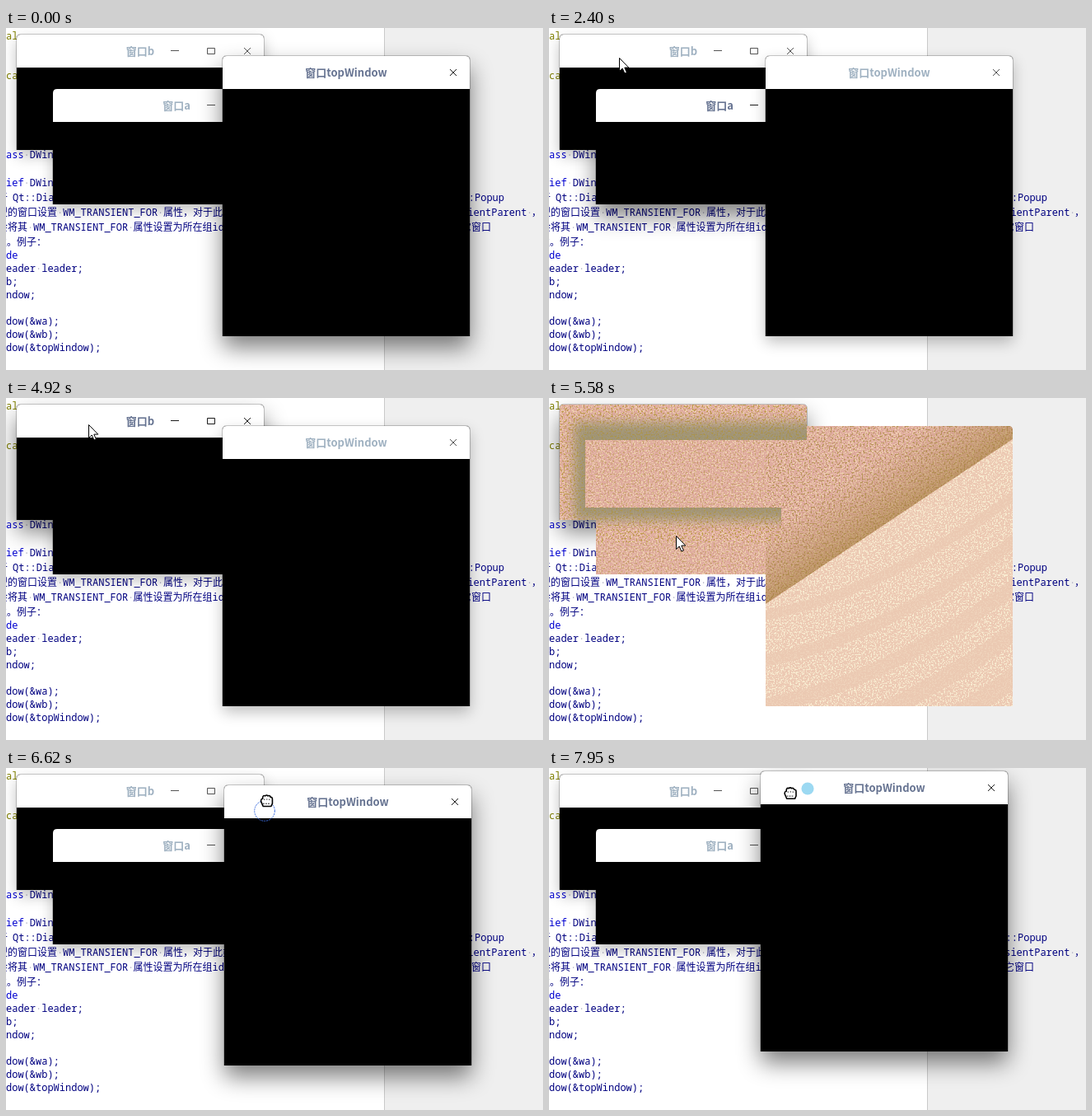
An HTML page for the animation above (7990 ms loop, 652 by 415 pixels).

```html
<!DOCTYPE html>
<html lang="zh">
<head>
<meta charset="utf-8">
<title>Window group stacking</title>
<style>
html, body { margin: 0; width: 100%; height: 100%; overflow: hidden; background: #fff; }
svg { display: block; }
.code text { font: 12px 'Noto Sans Mono', 'Noto Sans CJK SC', 'Noto Sans CJK', monospace; white-space: pre; fill: #000080; }
.code .tag { fill: #0000d0; }
.code .kw { fill: #808000; }
.code .dot { fill: #b4b4c8; }
.win text { font: bold 13px 'Noto Sans CJK SC', 'Noto Sans CJK', sans-serif; text-anchor: middle; fill: #9fb1c1; }
.win .btn { fill: none; stroke: #555; }
.win.active text { fill: #667391; }
.win.active .btn { stroke: #1c1c1c; }
.shade { filter: url(#soft); opacity: .25; }
.active .shade { filter: url(#deep); opacity: .5; }
</style>
</head>
<body>
<svg id="stage" width="652" height="415" viewBox="0 0 652 415">
  <defs>
    <filter id="soft" x="-30%" y="-30%" width="160%" height="170%"><feGaussianBlur stdDeviation="9"/><feOffset dy="7"/></filter>
    <filter id="deep" x="-30%" y="-40%" width="160%" height="190%"><feGaussianBlur stdDeviation="14"/><feOffset dy="14"/></filter>
    <filter id="blur"><feGaussianBlur stdDeviation="7"/></filter>
    <filter id="grain" x="0" y="0" width="1" height="1" color-interpolation-filters="sRGB">
      <feTurbulence type="fractalNoise" baseFrequency=".55" numOctaves="2" seed="4"/>
      <feColorMatrix values="0 0 0 0 0  0 0 0 0 0  0 0 0 0 0  9 0 0 0 -4.6"/>
      <feComposite in="SourceGraphic" operator="in"/>
    </filter>
    <filter id="grain2" x="0" y="0" width="1" height="1" color-interpolation-filters="sRGB">
      <feTurbulence type="fractalNoise" baseFrequency=".5" numOctaves="2" seed="9"/>
      <feColorMatrix values="0 0 0 0 0  0 0 0 0 0  0 0 0 0 0  0 10 0 0 -5.6"/>
      <feComposite in="SourceGraphic" operator="in"/>
    </filter>
    <linearGradient id="ridge" gradientUnits="userSpaceOnUse" x1="413" y1="150" x2="372" y2="88">
      <stop offset="0" stop-color="#a5813f" stop-opacity=".6"/><stop offset="1" stop-color="#b58a60" stop-opacity="0"/>
    </linearGradient>
    <clipPath id="panes"><path d="M13 148V13q0-5 5-5H308q5 0 5 5V34H558q5 0 5 5V374H263V214H57V148Z"/></clipPath>
    <clipPath id="frame"><path d="M13 8H313V51H44V133H282V175H13Z"/></clipPath>
    <clipPath id="dune"><path d="M563 50L263 250V374H563Z"/></clipPath>
  </defs>
  <path d="M0 0H459V415H0Z" fill="#fff"/>
  <path d="M459 0H652V415H459Z" fill="#efefef"/>
  <path d="M459.5 0V415" stroke="#cacaca"/>
  <g class="code" id="code"></g>
  <g id="wins"></g>
  <g id="sand" clip-path="url(#panes)" display="none">
    <path d="M0 0H570V380H0Z" fill="#dfab9f"/>
    <path d="M0 0H570V380H0Z" fill="#efd0b0" filter="url(#grain)"/>
    <path d="M0 0H570V380H0Z" fill="#b9954f" opacity=".6" filter="url(#grain2)"/>
    <path d="M263 34H563V50L263 250Z" fill="url(#ridge)"/>
    <path d="M263 34H563V50L263 250Z" fill="#a07f3a" opacity=".4" filter="url(#grain2)"/>
    <g clip-path="url(#frame)">
      <path d="M30 29H335V149H30Z" fill="#96906e" opacity=".85" filter="url(#blur)"/>
      <path d="M13 8H313V175H13Z" fill="#b6952f" opacity=".55" filter="url(#grain2)"/>
    </g>
    <g clip-path="url(#dune)">
      <path d="M263 50H563V374H263Z" fill="#ecc9b3"/>
      <path d="M263 50H563V374H263Z" fill="#f8ebd0" filter="url(#grain)"/>
      <g id="bands" fill="none" stroke="#ecc9b3" stroke-opacity=".7"></g>
    </g>
  </g>
  <circle id="disc" fill="#9cd9f2"/>
  <circle id="ring" r="12.3" fill="none" stroke="#3a6ce0" stroke-dasharray="2 1"/>
  <path id="arrow" d="M.5 .5V16.5L4.2 13 6.9 19 9.4 18 6.8 12.1H11.8Z" fill="#fff" stroke="#000"/>
  <g id="hand" stroke="#000" stroke-linecap="round" stroke-linejoin="round">
    <path d="M-6.8 1V-.5Q-6.5 -2.5 -4.8 -2.3V-4Q-4 -7 -1.8 -5.8Q0 -7.5 1.6 -5.8Q4 -6.8 4.8 -4.2Q7.2 -4.5 7 -1.5V3.5L5.5 6.8H-4.3Z" fill="#fff" stroke-width="1.6"/>
    <path d="M-3 -1.4h.6M0 -1.6h.6M3 -1.4h.6M-4 3.6h8" fill="none" stroke-width=".9" stroke-dasharray="1 2"/>
  </g>
</svg>
<script>
const LOOP = 7990;
const $ = id => document.getElementById(id);

// x, baseline, text, class
const lines = [
  [0, 14, 'al', 'kw'], [0, 62, 'ca', 'kw'],
  [0, 158, 'ass', 'tag'], [21.6, 158, '·', 'dot'], [28.8, 158, 'DWindow'],
  [0, 192, 'ief', 'tag'], [21.6, 192, '·', 'dot'], [28.8, 192, 'DWindow'],
  [-10, 210, '于'], [8, 210, 'Qt::Dialog'], [554.6, 210, '::Popup'],
  [-10, 228, '型的窗口设置'], [62, 228, '·', 'dot'], [69, 228, 'WM_TRANSIENT_FOR'],
  [184, 228, '·', 'dot'], [191, 228, '属性，对于此类'],
  [524.4, 228, 'TransientParent'], [632, 228, '·', 'dot'], [638, 228, '，'],
  [-10, 246, '会将其'], [26, 246, '·', 'dot'], [33, 246, 'WM_TRANSIENT_FOR'],
  [148, 246, '·', 'dot'], [154.5, 246, '属性设置为所在组id，'], [553, 246, '它窗口'],
  [-11, 264, '性。例子：'], [0, 280, 'de', 'tag'],
  [0, 296, 'eader'], [36, 296, '·', 'dot'], [43.2, 296, 'leader;'],
  [0, 312, 'b;'], [0, 328, 'ndow;'],
  [0, 360, 'dow(&amp;wa);'], [0, 376, 'dow(&amp;wb);'], [0, 392, 'dow(&amp;topWindow);']
];
$('code').innerHTML = lines.map(([x, y, s, c = '']) => `<text x="${x}" y="${y}" class="${c}">${s}</text>`).join('');

const frame = (id, title, h, buttons) => `<g class="win" id="${id}">
  <rect class="shade" width="300" height="${h}" rx="4"/>
  <path d="M0 ${h}V5Q0 0 5 0H295Q300 0 300 5V${h}Z" fill="#000"/>
  <path d="M0 40V5Q0 0 5 0H295Q300 0 300 5V40Z" fill="#fff"/>
  <path d="M-.5 ${h}V5Q-.5 -.5 5 -.5H295Q300.5 -.5 300.5 5V${h}" fill="none" stroke="#000" stroke-opacity=".2"/>
  <text x="150" y="25">${title}</text>
  <path class="btn" d="${buttons}M276 16l8 8M284 16l-8 8"/></g>`;
const minMax = 'M187 19.5h10M231.5 16.5h9v7h-9z';
$('wins').innerHTML = frame('b', '窗口b', 140, minMax) + frame('a', '窗口a', 140, minMax) + frame('top', '窗口topWindow', 340, '');

let bands = '';
for (let i = 0; i < 5; i++) {
  const y = 190 + i * 55;
  bands += `<path d="M255 ${y + 75}Q400 ${y + 50} 570 ${y - 75}" stroke-width="${12 + i * 3}"/>`;
}
$('bands').innerHTML = bands;

// time, x, y
const pointer = [
  [1240, 129, 72], [1920, 129, 72], [2400, 85, 35.5], [2800, 85, 35.5], [3500, 126, 190], [3580, 126, 196],
  [4000, 126, 196], [4500, 100, 32], [4920, 100, 32], [5540, 154, 166.5], [5740, 154, 166.5],
  [6060, 313, 51.5], [6340, 313, 51.5], [6420, 314, 51], [6880, 320, 23], [7060, 320, 23],
  [7120, 327, 24], [7360, 142, 42], [7620, 314, 25], [7790, 314, 25], [7950, 293, 30.5]
];
const topPath = [[6400, 263, 34], [6900, 268, 3], [7790, 268, 3], [7950, 257, 4]];
const focus = [[0, 'top'], [1240, 'a'], [2720, 'b'], [3880, 'a'], [4560, 'b'], [5620, 'a'], [6340, 'top']];
// time, x, y, end
const presses = [
  [1240, 130, 73, 1600], [2720, 86, 36, 3080], [3880, 127, 197, 4240], [4560, 101, 33, 4900],
  [5620, 155, 168, 6340], [6340, 314, 52, 6700], [7790, 314, 25, LOOP]
];

function along(keys, t) {
  const i = keys.findIndex(k => k[0] > t);
  if (i === 0) return keys[0].slice(1);
  if (i < 0) return keys[keys.length - 1].slice(1);
  const [t0, x0, y0] = keys[i - 1], [t1, x1, y1] = keys[i];
  const u = (t - t0) / (t1 - t0), e = u * u * (3 - 2 * u);
  return [x0 + (x1 - x0) * e, y0 + (y1 - y0) * e];
}
const show = (el, on) => el.setAttribute('display', on ? 'inline' : 'none');
const move = (el, [x, y]) => el.setAttribute('transform', `translate(${x} ${y})`);

let stacked = 'a';
function stack(id) {
  if (id === stacked || id === 'top') return;
  stacked = id;
  $('wins').insertBefore($(id), $('top'));
}

function draw(t) {
  const active = focus.filter(f => f[0] <= t).pop()[1];
  const bare = t >= 5580 && t < 5620;
  stack(t < 1240 ? 'a' : active);
  for (const id of ['a', 'b', 'top']) {
    $(id).classList.toggle('active', id === active);
    show($(id), !bare || id === 'b');
  }
  move($('b'), [13, 8]);
  move($('a'), [57, 74]);
  move($('top'), along(topPath, t).map(Math.round));
  show($('sand'), bare);

  const press = presses.find(p => t >= p[0] && t < p[3]);
  const age = press ? t - press[0] : 0;
  show($('disc'), press && age < 260);
  show($('ring'), press && age >= 260);
  if (press) {
    $('disc').setAttribute('r', Math.min(12, age * 7.5 / 160));
    for (const id of ['disc', 'ring']) move($(id), press.slice(1, 3));
  }

  const held = t >= 6400 && t < 7060 || t >= 7810;
  const at = along(pointer, t);
  show($('arrow'), t >= 1240 && !held);
  show($('hand'), held);
  move($('arrow'), at.map(Math.round));
  move($('hand'), at);
}

const start = performance.now();
function tick() {
  draw((performance.now() - start) % LOOP);
  requestAnimationFrame(tick);
}
draw(0);
requestAnimationFrame(tick);
</script>
</body>
</html>
```
